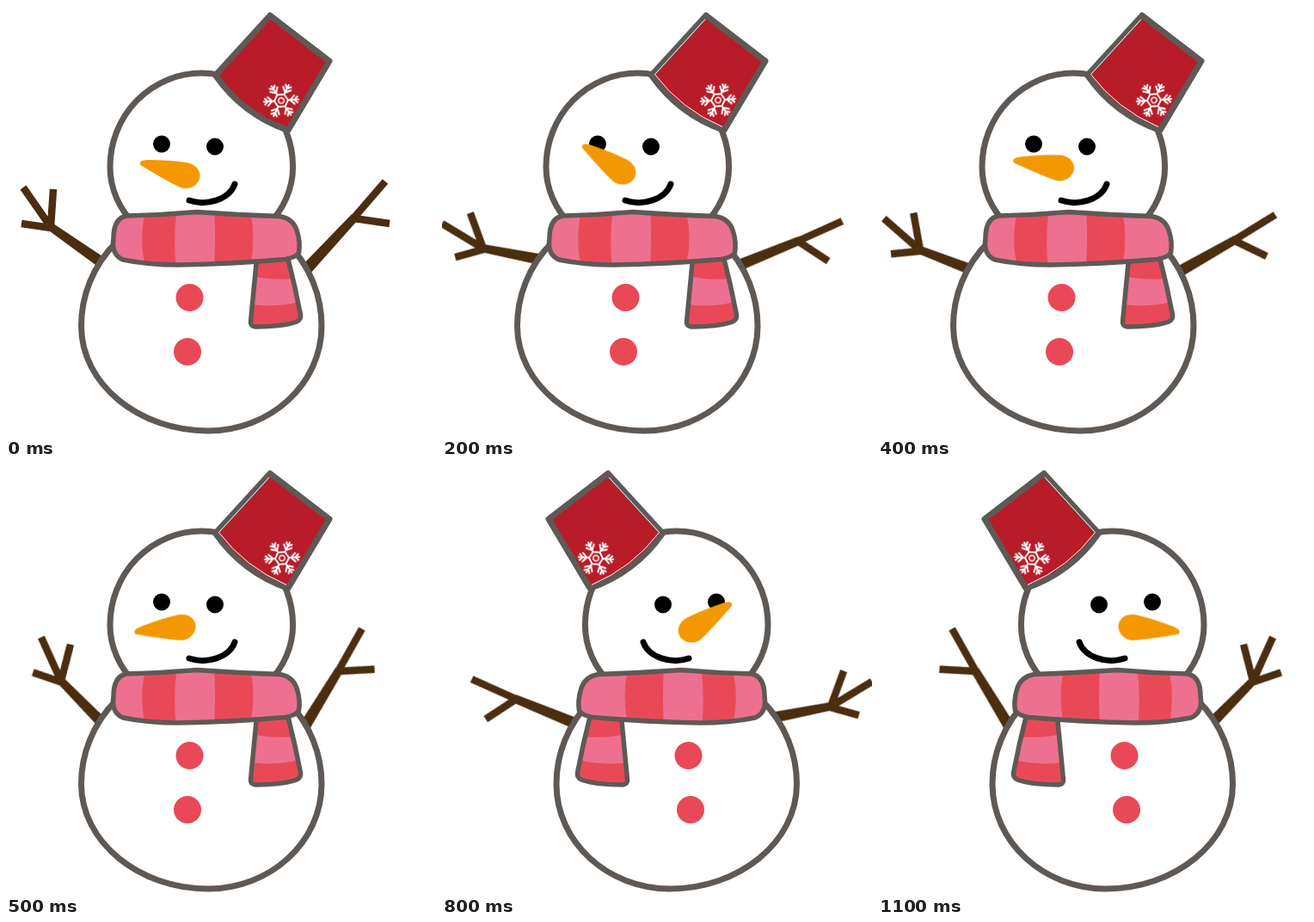
Recreate the animation shown at these times as an HTML page. Size 500 by 500 pixels, loop 1200 ms.

```html
<!DOCTYPE html>
<html lang="en">
<head>
<meta charset="utf-8">
<title>Waving snowman</title>
<style>
  html, body { margin: 0; width: 100%; height: 100%; overflow: hidden; background: #fff; }
  svg { display: block; width: 100vw; height: 100vh; }

  .line { stroke: #5f5955; stroke-width: 7; stroke-linejoin: round; }
  .thin { stroke-width: 5.5; }
  .snow { fill: #fff; }
  .pink { fill: #ed7090; }
  .red { fill: #e94957; }
  .twig { fill: none; stroke: #4b2d10; stroke-width: 8.5; }
  .trunk { fill: #4b2d10; stroke: none; }
  .none { fill: none; }

  #snowman { animation: turn 1200ms step-end infinite; }
  #armL { animation: armL 600ms step-end infinite; }
  #armR { animation: armR 600ms step-end infinite; }
  #nose { animation: nose 600ms step-end infinite; }
  #gap { animation: gap 600ms step-end infinite; }
  #flake { animation: flake 600ms step-end infinite; }

  @keyframes turn {
    0% { transform: none; }
    50% { transform: translate(500px, 0) scale(-1, 1); }
  }
  @keyframes armL {
    0% { transform: translate(52px, 257px); }
    16.66% { transform: translate(50px, 269px) rotate(-12deg); }
    33.33% { transform: translate(48px, 282px) rotate(-24deg); }
    50% { transform: translate(44px, 300px) rotate(-37deg); }
    66.66% { transform: translate(49px, 284px) rotate(-14deg); }
    83.33% { transform: translate(64px, 252.5px) rotate(10.5deg); }
  }
  @keyframes armR {
    0% { transform: translate(405px, 246px); }
    16.66% { transform: translate(410px, 260px) rotate(12deg); }
    33.33% { transform: translate(415px, 273px) rotate(25deg); }
    50% { transform: translate(422px, 290px) rotate(37deg); }
    66.66% { transform: translate(415px, 272px) rotate(17.5deg); }
    83.33% { transform: translate(387px, 240px) rotate(-11.5deg); }
  }
  @keyframes nose {
    0% { transform: translate(211px, 197px); }
    16.66% { transform: translate(211px, 195px) rotate(9deg); }
    33.33% { transform: translate(211px, 193px) rotate(18deg); }
    50% { transform: translate(212px, 191px) rotate(6deg); }
    66.66% { transform: translate(213.5px, 188px) rotate(-6.5deg); }
    83.33% { transform: translate(206px, 189px) rotate(-21.5deg); }
  }
  @keyframes gap {
    0% { opacity: 0; }
    16.66% { opacity: 1; }
  }
  @keyframes flake {
    0% { transform: translate(320px, 110px); }
    16.66% { transform: translate(321px, 109.5px); }
  }
</style>
</head>
<body>
<svg viewBox="0 0 500 500">
  <defs>
    <path id="wrap" d="M140 244Q182 243 222 239.500Q272 243 318 244.500Q334 247 338.500 262Q342.500 275 340.500 287Q337 292 325 294.500Q262 300 200 301Q165 301 136 295Q122 289 125 270Q125 247 140 244Z"/>
    <path id="tail" d="M291.500 294L284.500 367Q284 372.500 290 373Q320 373 337 367.500Q343.500 365 342.500 359Q336 325 327.500 292Z"/>
    <path id="hat" d="M307 11L376 64L328 144.500Q275 126 243.500 80.500Z"/>
    <clipPath id="inWrap"><use href="#wrap"/></clipPath>
    <clipPath id="inTail"><use href="#tail"/></clipPath>
    <path id="ray" d="M0 -7V-21M-4 -19.500L0 -15.500L4 -19.500M-5.500 -16L0 -10.500L5.500 -16"/>
  </defs>

  <g id="snowman">
    <g id="armL" class="twig">
      <path d="M-32 -46L0 0L3 -44M-34 -4L0 1" stroke-linejoin="bevel"/>
      <path class="trunk" d="M3 -4L60 34L52 44L-5 2Z"/>
    </g>
    <g id="armR" class="twig">
      <path d="M36 -42L-2 2M0 1L41 7"/>
      <path class="trunk" d="M-3 -4L4 3L-52 66L-62 57Z"/>
    </g>

    <path class="snow line" d="M87.500 372A139.750 138 0 0 1 367 372C367 440 307 494 235 494C155 494 87.500 440 87.500 372Z"/>
    <path class="snow line" d="M121 187A106.3 109 0 0 1 333.6 187A106.3 98 0 0 1 121 187Z"/>

    <g class="red">
      <circle cx="213.5" cy="339" r="16"/>
      <circle cx="211" cy="402" r="16"/>
    </g>

    <g clip-path="url(#inTail)">
      <use href="#tail" class="red"/>
      <path class="pink" d="M280 312Q310 321 345 316V343Q312 352 280 346Z"/>
    </g>
    <use href="#tail" class="none line thin"/>
    <g clip-path="url(#inWrap)">
      <use href="#wrap" class="pink"/>
      <path class="red" d="M163 235Q154 270 162 305H198Q194 270 199 235ZM242 235Q244 270 242 305H283Q292 270 283 235Z"/>
    </g>
    <use href="#wrap" class="none line thin"/>

    <circle cx="181" cy="160.5" r="10"/>
    <circle cx="243" cy="163.5" r="10"/>
    <path d="M213 226C233 233 260 225 266 207" fill="none" stroke="#000" stroke-width="7" stroke-linecap="round"/>
    <path id="nose" fill="#f39800" d="M-55 -15Q-54 -18 -46 -18Q-21 -18 -1 -15C10 -13 15 -6 14.500 2C13 11 4 16 -5 15Q-13 13 -53 -11Q-56 -13 -55 -15Z"/>

    <use href="#hat" fill="#b81c28" class="line"/>
    <path id="gap" class="none" stroke="#fff" d="M306 15.500L247.500 79.500Q278 120 326 140.500"/>
    <g id="flake" class="none" stroke="#fff" stroke-width="2">
      <g transform="rotate(26)">
        <use href="#ray"/>
        <use href="#ray" transform="rotate(60)"/>
        <use href="#ray" transform="rotate(120)"/>
        <use href="#ray" transform="rotate(180)"/>
        <use href="#ray" transform="rotate(240)"/>
        <use href="#ray" transform="rotate(300)"/>
        <path d="M0 -8L7 -4V4L0 8L-7 4V-4Z"/>
        <circle r="3.2" stroke-width="1.5"/>
      </g>
    </g>
  </g>
</svg>
</body>
</html>
```
